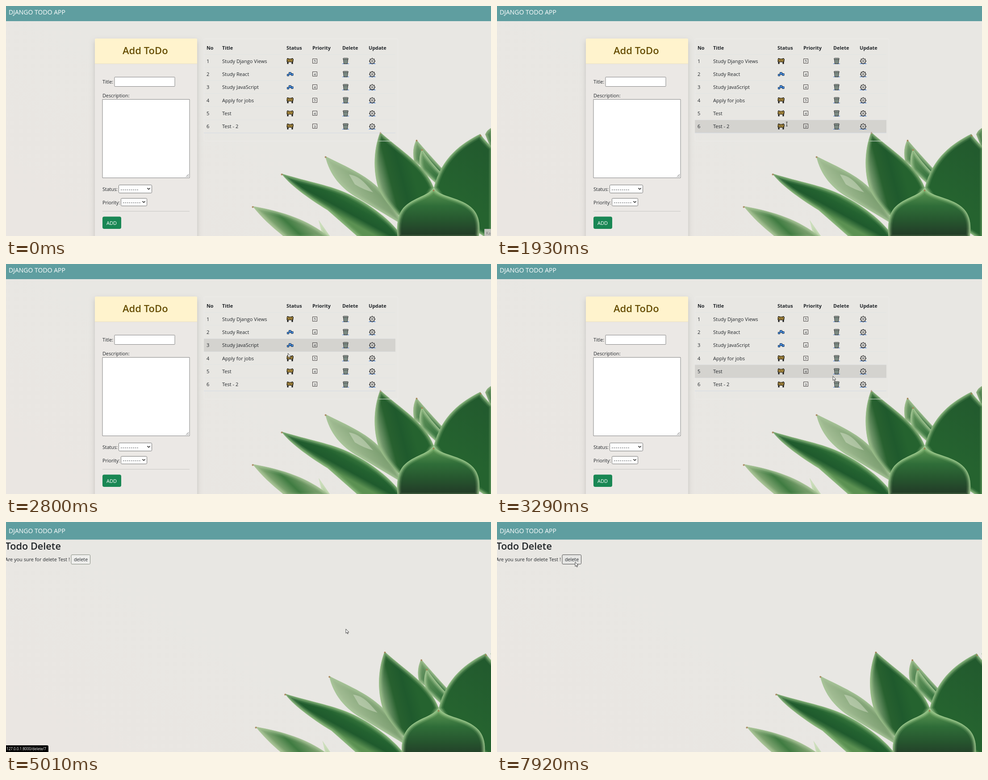
An HTML page with a canvas for the animation above (7990 ms loop, 1086 by 516 pixels).

```html
<!DOCTYPE html>
<html lang="en">
<head>
<meta charset="utf-8">
<title>Todo app</title>
<style>
html, body { margin: 0; width: 100%; height: 100%; overflow: hidden; background: #e8e7e3; }
canvas { display: block; }
</style>
</head>
<body>
<canvas id="stage" width="1086" height="516"></canvas>
<script>
const W = 1086, H = 516, LOOP = 7990, STEP = 66.7;
const ctx = document.getElementById('stage').getContext('2d');
const INK = '#212529', FONT = '"Open Sans", "Noto Sans", sans-serif';

// time, x, y, cursor kind from then on: a = arrow, i = text beam, h = hand
const path = [
  [0, 1092, 520, 'a'], [70, 1080, 506, 'a'], [300, 760, 330, 'a'], [550, 380, 150, 'a'],
  [810, 32, 60, 'a'], [880, 32, 50, 'a'], [1130, 255, 168, 'i'], [1400, 395, 290, 'i'],
  [1670, 262, 438, 'a'], [1740, 275, 432, 'a'], [1860, 590, 276, 'i'], [1930, 648, 267, 'i'],
  [2200, 700, 130, 'a'], [2530, 650, 125, 'i'], [2590, 640, 128, 'a'], [2800, 631, 200, 'a'],
  [3000, 690, 268, 'a'], [3180, 738, 252, 'a'], [3265, 752, 252, 'a'], [3330, 755, 244, 'a'],
  [3400, 757, 239, 'h'], [3490, 759, 236, 'h'], [3950, 759, 236, 'h'], [4080, 767, 248, 'h'],
  [4270, 767, 248, 'h'], [4340, 761, 240, 'h'], [4800, 761, 240, 'a'], [5570, 761, 240, 'a'],
  [6300, 28, 90, 'i'], [6430, 28, 90, 'i'], [6665, 103, 90, 'i'], [7040, 124, 90, 'i'],
  [7180, 128, 90, 'a'], [7370, 175, 90, 'a'], [LOOP, 175, 90, 'a']
];

const todos = [
  ['Study Django Views', 'work', 5], ['Study React', 'sleep', 4], ['Study JavaScript', 'sleep', 4],
  ['Apply for jobs', 'work', 5], ['Test', 'work', 4], ['Test - 2', 'work', 3]
];

// outline, gradient line, gradient colours, rim colour
const leaves = [
  ['M919 300Q908 322 914 348L975 395L985 374Q940 325 919 300Z', [915, 310, 970, 380], ['#6d9866', '#2c6b38'], '#a9c797'],
  ['M931 321Q920 350 932 370L965 400L978 378Q950 350 931 321Z', [925, 340, 970, 385], ['#5f9059', '#35733d'], '#b3d2a0'],
  ['M1090 272Q1078 276 1073 288L1090 330Z', [1075, 280, 1090, 300], ['#5b8a55', '#2c6435'], '#9dbb8c'],
  ['M1062 287C1020 308 975 340 958 408L1000 470L1090 530V318Q1072 302 1062 287Z', [1075, 310, 1000, 420], ['#225a2e', '#25632f'], '#a4cb93'],
  ['M715 337C724 378 750 410 790 432L890 492Q862 432 838 412C805 378 765 362 715 337Z', [750, 410, 800, 372], ['#a9c19a', '#7c9f71'], '#a9c79a'],
  ['M700 480L735 530H712Z', [705, 490, 725, 520], ['#c3d8b2', '#8fb57e'], '#cfe0bf'],
  ['M552 449C575 478 597 497 628 522H728C682 483 627 462 552 449Z', [615, 506, 650, 470], ['#86a977', '#3f7b41', '#729a67'], '#b3cba2'],
  ['M617 376C632 398 674 430 720 458L795 524H890C880 500 835 455 770 423C727 402 678 395 617 376Z', [700, 446, 724, 402], ['#5b9152', '#1f5a2d', '#236230', '#37763c'], '#9cc38a'],
  ['M838 283C824 318 820 368 835 412Q850 442 880 470L900 500L958 408C938 355 885 326 838 283Z', [828, 370, 905, 350], ['#86a67c', '#28612f', '#1f5a2d', '#25632f'], '#9fc48e'],
  ['M957 408C945 428 905 430 886 458Q872 480 877 522H1058Q1066 478 1046 456C1020 428 972 430 957 408Z', [957, 415, 957, 516], ['#5a9452', '#2f6d38', '#26552e', '#223a27'], '#aad397']
].map(([d, line, colors, rim]) => {
  const fill = ctx.createLinearGradient(...line);
  colors.forEach((c, i) => fill.addColorStop(i / (colors.length - 1), c));
  return { shape: new Path2D(d), fill, rim };
});
const tips = [[838, 283], [715, 337], [617, 376], [552, 449], [919, 300], [931, 321], [1062, 289], [957, 412]];

const arrow = new Path2D('M0 0V9.6L2.3 7.6L3.8 11L5.2 10.4L3.8 7.2H6.8Z');
const hand = new Path2D('M-1 1Q0 -1 1 1V5L5 6Q6 6 6 8L5 13H-1L-4 8Q-3 6 -1 8Z');

function box(x, y, w, h, fill, stroke, radius = 0) {
  ctx.beginPath();
  ctx.roundRect(x, y, w, h, radius);
  if (fill) { ctx.fillStyle = fill; ctx.fill(); }
  if (stroke) { ctx.strokeStyle = stroke; ctx.lineWidth = 1; ctx.stroke(); }
}

function text(s, x, y, size = 11.05, weight = 400, color = INK) {
  ctx.font = `${weight} ${size}px ${FONT}`;
  ctx.fillStyle = color;
  ctx.fillText(s, x, y);
}

function line(x1, y1, x2, y2, color, width = 1) {
  ctx.beginPath();
  ctx.moveTo(x1, y1);
  ctx.lineTo(x2, y2);
  ctx.strokeStyle = color;
  ctx.lineWidth = width;
  ctx.stroke();
}

function dot(x, y, r, fill, stroke, width = 1) {
  ctx.beginPath();
  ctx.arc(x, y, r, 0, 7);
  if (fill) { ctx.fillStyle = fill; ctx.fill(); }
  if (stroke) { ctx.strokeStyle = stroke; ctx.lineWidth = width; ctx.stroke(); }
}

function at(x, y, draw) {
  ctx.save();
  ctx.translate(x, y);
  draw();
  ctx.restore();
}

function backdrop() {
  const g = ctx.createLinearGradient(0, 450, 250, 50);
  g.addColorStop(0, '#eae6e2');
  g.addColorStop(1, '#e8e7e3');
  box(0, 0, W, H, g);
}

function plant() {
  for (const { shape, fill, rim } of leaves) {
    ctx.save();
    ctx.clip(shape);
    ctx.fillStyle = fill;
    ctx.fill(shape);
    ctx.strokeStyle = rim;
    for (const [width, alpha] of [[18, .12], [13, .2], [9, .35], [4, .5]]) {
      ctx.lineWidth = width;
      ctx.globalAlpha = alpha;
      ctx.stroke(shape);
    }
    ctx.restore();
  }
  // glossy patch on the pale leaf
  ctx.globalAlpha = .45;
  ctx.fillStyle = '#d9e3cf';
  ctx.fill(new Path2D('M768 378Q788 380 806 400L822 418Q800 412 781 400Z'));
  ctx.globalAlpha = .8;
  for (const [x, y] of tips) dot(x + .5, y + 2, 2, '#a5794c');
  ctx.globalAlpha = 1;
}

function header(h, baseline) {
  box(0, 0, W, h, '#5f9ea0');
  text('DJANGO TODO APP', 6, baseline, 14, 400, '#fff');
}

function select(x, y, w, h) {
  box(x, y, w, h, '#fff', '#767676', 2);
  ctx.letterSpacing = '1px';
  text('---------', x + 4, y + h / 2 + 4, 11);
  ctx.letterSpacing = '0px';
  const cx = x + w - 7, cy = y + h / 2 - 1;
  line(cx - 3, cy - 1, cx, cy + 2, '#111', 1.5);
  line(cx, cy + 2, cx + 3, cy - 1, '#111', 1.5);
}

function form() {
  ctx.save();
  ctx.shadowColor = 'rgba(0,0,0,.16)';
  ctx.shadowBlur = 12;
  ctx.shadowOffsetY = 5;
  box(199, 73, 229, 470, '#ebe8e5', null, 3);
  ctx.restore();
  box(199, 73, 229, 57, '#fff3cd', null, [3, 3, 0, 0]);
  line(199, 129.5, 428, 129.5, '#e9dfc4');
  text('Add ToDo', 261, 108, 22, 600, '#664d03');

  text('Title:', 216, 174, 10.8);
  box(243, 159.5, 135, 21, '#fff', '#858585', 1);
  text('Description:', 216, 205, 10.8);
  box(216, 209.5, 195, 176, '#fff', '#858585');
  line(403, 383.5, 409, 377.5, '#555');
  line(406.5, 383.5, 409, 381, '#555');
  text('Status:', 216, 415, 10.7);
  select(252.5, 401.5, 74, 18);
  text('Priority:', 216, 444.5, 10.7);
  select(257.5, 431.5, 58, 17);
  line(216, 460.5, 411, 460.5, '#c9c7c4');
  box(216, 472.5, 42, 27.5, '#198754', null, 4);
  text('ADD', 225, 490.5, 11, 400, '#fff');
}

const icons = {
  work() {
    box(-6.5, -6.5, 3, 13, '#1b1b1b');
    box(3.5, -6.5, 3, 13, '#1b1b1b');
    box(-7, -5, 14, 7, '#f2c14b', '#1b1b1b', 1);
    for (let x = -5; x < 7; x += 3.6) line(x - 1.6, 1.5, x + 1.6, -4.5, '#1b1b1b', 1.4);
  },
  sleep() {
    for (const [x, y, s] of [[-6.5, 0, 4], [-2.5, -4, 5], [2.5, -1.5, 4.5]]) {
      box(x, y, s, s, '#2f7fe0', '#14304f');
      line(x + 1, y + s - 1, x + s - 1, y + 1, '#bfdcff', .8);
    }
  },
  trash() {
    line(-7.5, 6, 7.5, 6, '#2a74e0');
    ctx.beginPath();
    [[-5, -5], [5, -5], [4, 6], [-4, 6]].forEach(p => ctx.lineTo(...p));
    ctx.closePath();
    ctx.fillStyle = '#899a92';
    ctx.fill();
    ctx.strokeStyle = '#222';
    ctx.lineWidth = 1;
    ctx.stroke();
    for (const x of [-2, 0, 2]) line(x, -2, x * .85, 5, '#64716b', .7);
    box(-5.8, -6.5, 11.6, 3, '#a5b2ab', '#222', 1.5);
  },
  gear() {
    line(-7.5, 6, 7.5, 6, '#2a74e0');
    dot(0, 0, 5.6, '#e2e1dd', '#222', 1.1);
    dot(0, 0, 1.2, null, '#222', .9);
    for (let i = 0; i < 8; i++) {
      const c = Math.cos(i * Math.PI / 4), s = Math.sin(i * Math.PI / 4);
      dot(c * 3.5, s * 3.5, .6, '#333');
      line(c * 5.5, s * 5.5, c * 7, s * 7, '#222', 1.6);
    }
  }
};

function table(hover) {
  box(443.5, 73.5, 434, 229.5, null, 'rgba(240,241,240,.4)', 2);
  line(836, 303, 878, 303, 'rgba(235,240,235,.7)');
  const heads = { No: 449, Title: 484, Status: 628, Priority: 686, Delete: 753, Update: 812 };
  for (const name in heads) text(name, heads[name], 98, 10.9, 700);
  todos.forEach(([title, icon, priority], i) => {
    const top = 108.9 + i * 29.35, mid = top + 14.7;
    if (i === hover) box(443, top, 429, 29.35, 'rgba(0,0,0,.085)');
    line(443, Math.round(top) - .5, 872, Math.round(top) - .5, 'rgba(222,226,230,.5)');
    text(i + 1, 449, mid + 4);
    text(title, 484, mid + 4);
    at(636, mid, icons[icon]);
    box(686.5, Math.round(mid) - 5.5, 10, 10, null, '#4a4545');
    text(priority, 689.2, mid + 2.8, 8);
    at(760.5, mid, icons.trash);
    at(820, mid, icons.gear);
  });
  line(443, 284.8, 872, 284.8, '#d3dae4');
}

function home(t) {
  plant();
  header(34, 19.3);
  form();
  table(rowAt(pointer(t - STEP)));
  if (t < 70) {
    box(1071.5, 500.5, 20, 20, '#c3c5bf', '#aeb3ab');
    text('Ka', 1075, 513, 8.5, 400, '#777');
  }
}

function confirm(hover) {
  at(0, 0, () => {
    ctx.transform(1.01, 0, 0, 1.015, 1.5, 3.5);
    plant();
  });
  header(39.5, 25);
  text('Todo Delete', -1.5, 62, 21.7, 600);
  text('Are you sure for delete Test !', -2, 88, 10.9);
  box(146, 73.5, 42.5, 21, hover ? '#e6e6e4' : '#efefed', hover ? '#4f4f4f' : '#858b80', 2);
  text('delete', 152, 88, 10.75);
}

function statusBar(t) {
  const alpha = Math.min((t - 3600) / 160, (5430 - t) / 220, 1);
  if (t < 3680 || alpha <= 0) return;
  ctx.globalAlpha = alpha;
  box(0, 501, 95, 15, '#000', null, [0, 3, 0, 0]);
  text('127.0.0.1:8000/delete/7', 1, 512, 8.1, 400, '#fff');
  ctx.globalAlpha = 1;
}

// the pointer is sampled in even steps
function pointer(time) {
  const t = Math.max(0, Math.floor((time + 7) / STEP) * STEP);
  const i = Math.max(1, path.findIndex(p => p[0] > t));
  const [t0, x0, y0, kind] = path[i - 1], [t1, x1, y1] = path[i];
  const k = (t - t0) / (t1 - t0);
  return { x: x0 + (x1 - x0) * k, y: y0 + (y1 - y0) * k, kind };
}

function rowAt({ x, y }) {
  return x > 443 && x < 872 ? Math.floor((y - 108.9) / 29.35) : -1;
}

function cursor({ x, y, kind }) {
  at(x, y, () => {
    if (kind === 'i') {
      line(0, -4.5, 0, 4.5, '#333');
      line(-2, -4.5, 2, -4.5, '#333');
      line(-2, 4.5, 2, 4.5, '#333');
      return;
    }
    const shape = kind === 'h' ? hand : arrow;
    ctx.fillStyle = '#fff';
    ctx.fill(shape);
    ctx.strokeStyle = '#333';
    ctx.lineWidth = .9;
    ctx.stroke(shape);
  });
}

function frame() {
  const t = performance.now() % LOOP;
  const p = pointer(t);
  backdrop();
  if (t < 4810) home(t);
  else confirm(p.x > 146 && p.x < 189 && p.y < 95);
  statusBar(t);
  cursor(p);
  requestAnimationFrame(frame);
}
frame();
</script>
</body>
</html>
```
